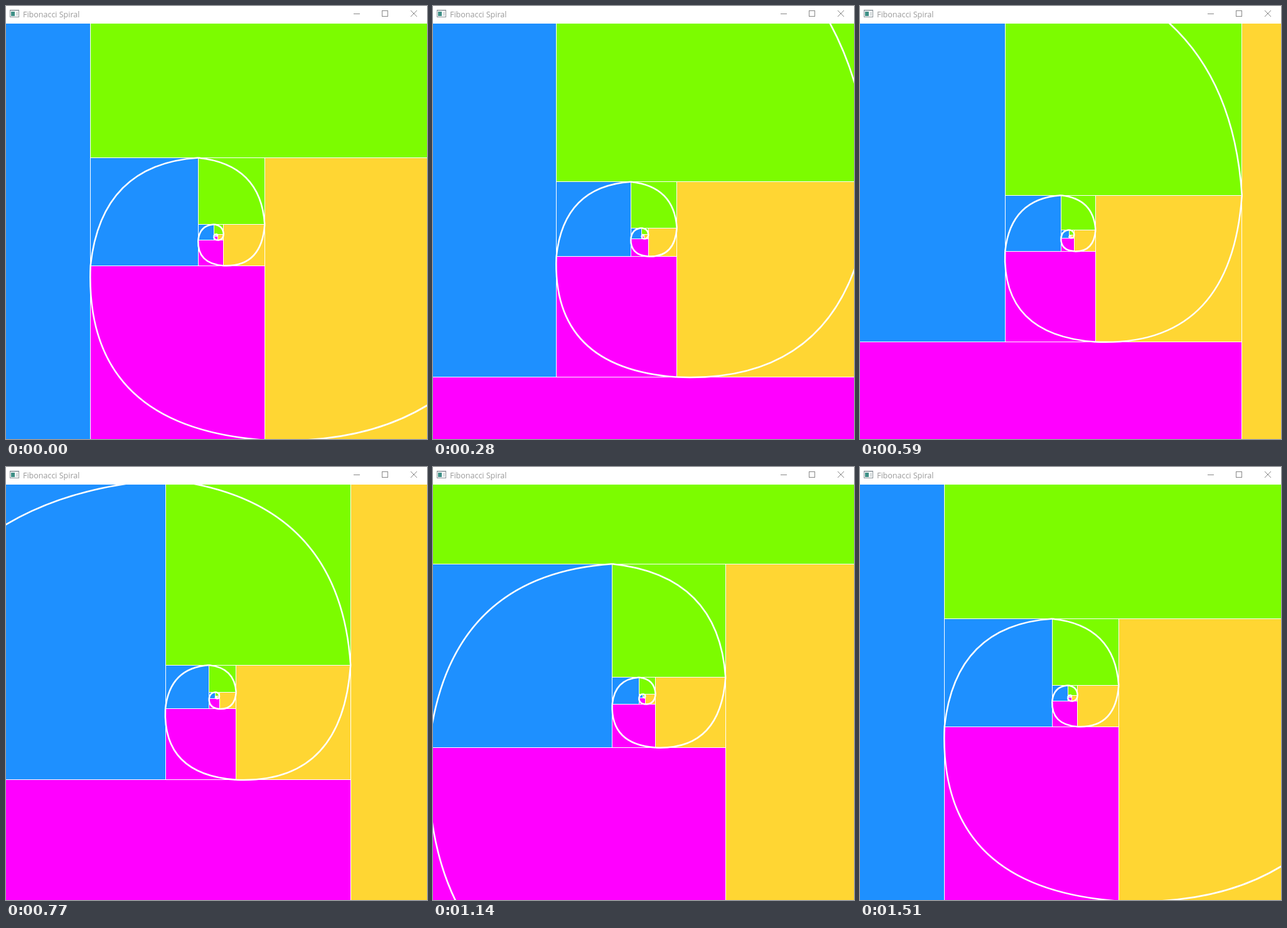
An HTML page with a canvas that plays this animation: 671 px wide and 689 px high, repeating every 1.53 s.

```html
<!DOCTYPE html>
<html lang="en">
<head>
<meta charset="utf-8">
<title>Fibonacci Spiral</title>
<style>
  html, body { margin: 0; width: 100%; height: 100%; overflow: hidden; background: #fff; }
  svg, canvas { position: absolute; left: 0; }
  svg { top: 0; }
  canvas { top: 28px; }
  text { font: 12.5px "Open Sans", "Noto Sans", sans-serif; fill: #999; }
</style>
</head>
<body>
<svg width="671" height="28">
  <rect x="6.5" y="6.5" width="14" height="11" fill="#fff" stroke="#8a9499"/>
  <path d="M7 7.5h13" stroke="#b9c2c6"/>
  <rect x="8" y="9" width="6" height="7" fill="#3f8f86"/>
  <path d="M16 10.5h3M16 12.5h3M16 14.5h3" stroke="#b4bcc0"/>
  <text x="27" y="18">Fibonacci Spiral</text>
  <g fill="none" stroke="#888">
    <path d="M554 12.5h10"/>
    <rect x="599.5" y="7.5" width="9" height="9"/>
    <path d="M645 7l10 10M655 7l-10 10"/>
  </g>
</svg>
<canvas id="view" width="671" height="661"></canvas>
<script>
const ctx = document.getElementById('view').getContext('2d');
const PHI = (1 + Math.sqrt(5)) / 2;
const LOOP = 1530, STEPS = 47, BASE = 171.6;
const POLE = { x: 335.1, y: 365.2 };
const COLORS = ['#1e90ff', '#ff00ff', '#ffd633', '#7cfc00'];

// [ms, zoom step] pairs; steps are evenly spaced in between
const TIMING = [[0, 0], [20, 1], [150, 5], [180, 6], [400, 13], [500, 14], [560, 16], [770, 22],
  [800, 23], [1000, 30], [1090, 33], [1300, 40], [1320, 41], [1510, 47], [LOOP, 47]];

function stepAt(ms) {
  const i = TIMING.findIndex(([time]) => time > ms);
  const [t0, n0] = TIMING[i - 1], [t1, n1] = TIMING[i];
  return Math.floor(n0 + (n1 - n0) * (ms - t0) / (t1 - t0) + 1e-6);
}

// Geometry of square k: each one is a quarter turn and PHI times larger than the last
function square(k, scale) {
  const size = BASE * scale * PHI ** k;
  const turn = ((k % 4) + 4) % 4;
  const place = (x, y) => {
    x = (x - 0.1708) * size;
    y = (y + 0.2764) * size;
    for (let i = 0; i < turn; i++) [x, y] = [y, -x];
    return [POLE.x + x, POLE.y + y];
  };
  return { size, turn, place };
}

function drawSquare({ turn, place }) {
  const [x0, y0] = place(0, 0).map(Math.round);
  const [x1, y1] = place(-1, -1).map(Math.round);
  ctx.fillStyle = COLORS[turn];
  ctx.fillRect(x0, y0, x1 - x0, y1 - y0);
  ctx.lineWidth = 1;
  ctx.strokeRect(x0, y0, x1 - x0, y1 - y0);
}

function drawArc({ turn, place }) {
  // Lower arcs bulge more than the upper ones
  const [along, out] = turn === 1 || turn === 2 ? [0.925, 1.04] : [0.9, 0.94];
  ctx.lineWidth = 2.5;
  ctx.beginPath();
  ctx.moveTo(...place(0, -1));
  ctx.quadraticCurveTo(...place(-along, -out), ...place(-1, 0));
  ctx.stroke();
}

function draw(ms) {
  const scale = PHI ** (-4 * stepAt(ms) / STEPS);
  const squares = [];
  for (let k = -12; k < 10; k++) squares.push(square(k, scale));
  const visible = squares.filter(s => s.size > 2);

  ctx.setTransform(1, 0, 0, 1, 0.5, -27.5);
  ctx.clearRect(-1, 27, 673, 663);
  ctx.strokeStyle = '#fff';
  visible.forEach(drawSquare);
  visible.forEach(drawArc);
}

const start = performance.now();
function tick() {
  draw((performance.now() - start) % LOOP);
  requestAnimationFrame(tick);
}
tick();
</script>
</body>
</html>
```
